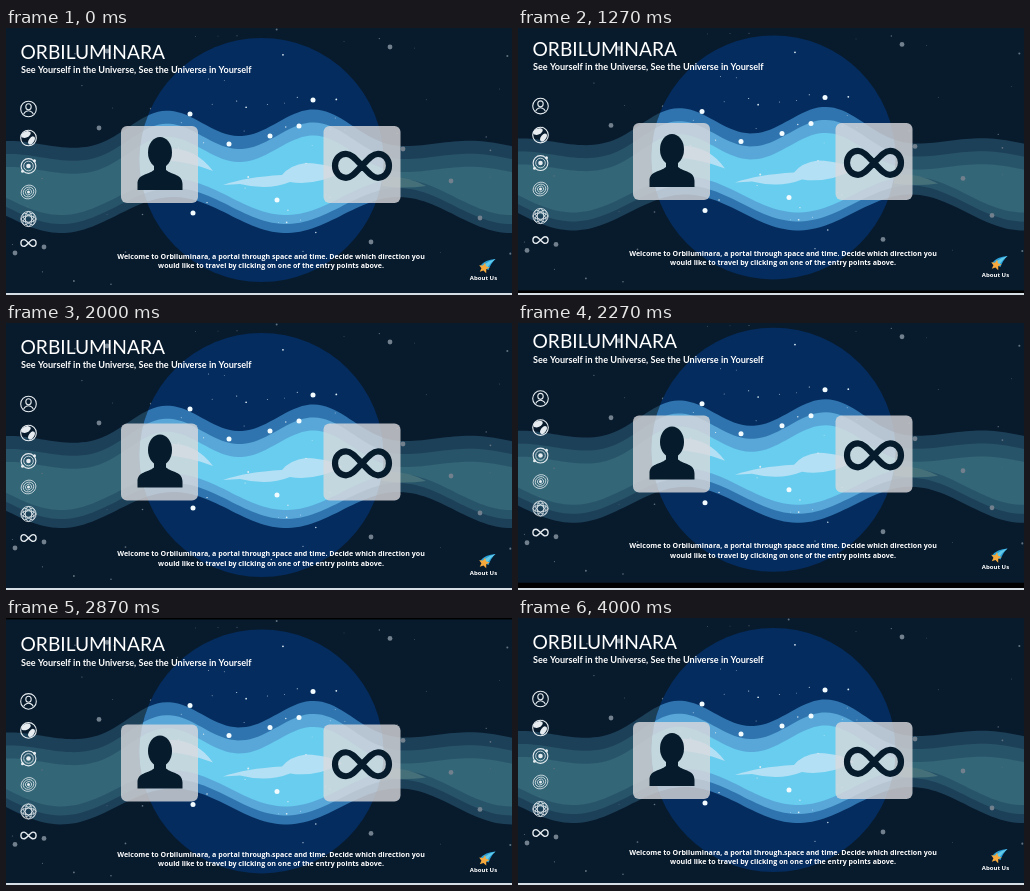
These frames come from a looping animation (506 px wide and 267 px high, 4070 ms). An HTML page with a canvas:

```html
<!DOCTYPE html>
<html lang="en">
<head>
<meta charset="utf-8">
<title>Orbiluminara</title>
<style>
html, body { margin: 0; width: 100%; height: 100%; overflow: hidden; background: #081b2d; }
canvas { display: block; width: 506px; height: 267px; }
</style>
</head>
<body>
<canvas id="stage"></canvas>
<script>
const W = 506, H = 267, FOOT = 265, LOOP = 4070, STEPS = 61;
const TAU = Math.PI * 2;
const SKY = '#081b2d', INK = '#061c2c';
const PLANET = { x: 255.5, y: 132, r: 122 };

const canvas = document.getElementById('stage');
const ctx = canvas.getContext('2d');
const dpr = window.devicePixelRatio || 1;
canvas.width = W * dpr;
canvas.height = H * dpr;

// Page travel: 0 is the bottom stop, TOP the top stop, beyond is rubber band.
const TOP = 6;
const swings = [
  [560, 0], [850, 9], [1250, -3], [1775, 10], [2240, -5.5],
  [2600, -3], [2670, 2], [2850, 8.5], [3070, TOP]
];

function scrollAt(t) {
  const next = swings.findIndex(k => k[0] >= t);
  if (next < 0) return TOP;
  if (next === 0) return 0;
  const [t0, a] = swings[next - 1], [t1, b] = swings[next];
  return a + (b - a) * (1 - Math.cos(Math.PI * (t - t0) / (t1 - t0))) / 2;
}

const overscroll = y => y < 0 ? y : Math.max(0, y - TOP);

function disc(x, y, r, color) {
  ctx.beginPath();
  ctx.arc(x, y, r, 0, TAU);
  ctx.fillStyle = color;
  ctx.fill();
}

function oval(x, y, rx, ry, turn = 0) {
  ctx.beginPath();
  ctx.ellipse(x, y, rx, ry, turn, 0, TAU);
}

function ring(x, y, rx, ry = rx, turn = 0) {
  oval(x, y, rx, ry, turn);
  ctx.stroke();
}

function fillPath(d, color) {
  ctx.fillStyle = color;
  ctx.fill(new Path2D(d));
}

// The river swells over the planet and calms down on both sides.
function upperEdge(x) {
  const swell = Math.exp(-(((x - 240) / 150) ** 4));
  return 118 - 24 * swell - (5 + 9 * swell) * Math.cos(TAU * (x - 156) / 155);
}

const lowerEdge = x => 187 + 18 * Math.cos(TAU * (x - 280) / 225);

const bands = [
  { inset: 0, dim: '#1d4059', lit: '#2f74ae' },
  { inset: 1, dim: '#28546a', lit: '#58a7d8' },
  { inset: 2, dim: '#336677', lit: '#68cdee' }
];

function drawBands(shade) {
  for (const b of bands) {
    ctx.beginPath();
    for (let x = 0; x <= W + 4; x += 4) ctx.lineTo(x, upperEdge(x) + 13 * b.inset);
    for (let x = W + 4; x >= -4; x -= 4) ctx.lineTo(x, lowerEdge(x) - 9 * b.inset);
    ctx.fillStyle = b[shade];
    ctx.fill();
  }
}

function scatter(seed, count, color, pick) {
  const rnd = () => (seed = seed * 16807 % 2147483647) / 2147483647;
  rnd();
  for (let i = 0; i < count; i++) {
    const [x, y] = pick(rnd);
    disc(x, y, 0.4 + 0.7 * rnd() ** 2, color);
  }
}

const onSky = rnd => [rnd() * W, rnd() * FOOT];

function onPlanet(rnd) {
  const a = rnd() * TAU, r = PLANET.r * 0.9 * Math.sqrt(rnd());
  return [PLANET.x + r * Math.cos(a), PLANET.y + r * Math.sin(a)];
}

const brightStars = [[184, 86], [307, 72], [293, 98], [223, 116], [264, 108], [271, 172], [187, 185]];
const paleStars = [[101, 23], [93, 100], [397, 121], [445, 153], [474, 190], [365, 214], [384, 19], [9, 225], [38, 219]];

function drawSky() {
  ctx.fillStyle = SKY;
  ctx.fillRect(0, 0, W, FOOT);
  drawBands('dim');
  fillPath('M376 149Q400 147 420 158Q398 161 376 158', '#45707a');
  scatter(17, 60, '#62727f', onSky);
  for (const [x, y] of paleStars) disc(x, y, 2.4, '#71808c');

  ctx.save();
  disc(PLANET.x, PLANET.y, PLANET.r, '#042c5f');
  ctx.clip();
  drawBands('lit');
  fillPath('M217 157Q240 149 276 147Q284 137 300 135Q325 136 336 144Q310 158 284 154Q262 163 234 156Z', '#b4e0f5');
  fillPath('M146 124Q184 112 207 143Q184 134 158 132Z', '#b4e0f5');
  ctx.restore();
  scatter(5, 36, '#dcecf5', onPlanet);
  for (const [x, y] of brightStars) disc(x, y, 2.5, '#f2fbff');
}

function infinity(x, y, scale, width, color) {
  ctx.save();
  ctx.translate(x, y);
  ctx.scale(scale, scale);
  ctx.lineWidth = width / scale;
  ctx.strokeStyle = color;
  ctx.beginPath();
  ctx.moveTo(0, 0);
  for (const s of [1, -1]) {
    ctx.bezierCurveTo(7 * s, -7.5, 11 * s, -12, 16 * s, -12);
    ctx.bezierCurveTo(22 * s, -12, 27 * s, -7, 27 * s, 0);
    ctx.bezierCurveTo(27 * s, 7, 22 * s, 12, 16 * s, 12);
    ctx.bezierCurveTo(11 * s, 12, 7 * s, 7.5, 0, 0);
  }
  ctx.stroke();
  ctx.restore();
}

function card(x) {
  ctx.beginPath();
  ctx.roundRect(x, 98, 77, 77, 6);
  ctx.fillStyle = 'rgba(218,218,220,.8)';
  ctx.fill();
}

function person() {
  ctx.fillStyle = INK;
  oval(154, 124.5, 12, 15.5);
  ctx.fill();
  fillPath('M148 134H160V142C166 147 176.5 146 176.5 156V162H131.5V156C131.5 146 142 147 148 142Z', INK);
}

function label(str, x, y, font, align = 'left') {
  ctx.font = font;
  ctx.textAlign = align;
  ctx.fillStyle = '#fff';
  ctx.fillText(str, x, y);
}

function drawContent() {
  card(115);
  person();
  card(317.5);
  infinity(356, 137.8, 1, 6.2, INK);
  const font = 'bold 7.08px "Open Sans", sans-serif';
  label('Welcome to Orbiluminara, a portal through space and time. Decide which direction you', 265, 230.6, font, 'center');
  label('would like to travel by clicking on one of the entry points above.', 265, 240, font, 'center');
}

function drawMenu() {
  const x = 22.5, line = '#e6ecf0';
  ctx.strokeStyle = ctx.fillStyle = line;
  ctx.lineWidth = 1.1;

  // person
  ring(x, 81, 7.8);
  ring(x, 78.8, 2.7, 3);
  ctx.beginPath();
  ctx.arc(x, 88, 5.2, Math.PI * 1.12, Math.PI * 1.88);
  ctx.stroke();

  // globe
  ring(x, 110, 7.8);
  oval(x - 2.5, 106.5, 5, 3, -0.4);
  ctx.fill();
  oval(x + 3, 112.5, 2.6, 4.5, 0.6);
  ctx.fill();

  // orbits
  ring(x, 138, 7.4);
  ctx.lineWidth = 0.8;
  ring(x, 138, 4.8);
  disc(x, 138, 2.3, line);
  for (const s of [1, -1]) disc(x + 6 * s, 138 - 5.3 * s, 1.5, line);

  // galaxy
  for (const r of [7.6, 5.4, 3.2]) ring(x, 164, r, r * 0.88, -0.5);
  disc(x, 164, 1.5, line);

  // lattice
  ring(x, 191, 7.6);
  for (let i = 0; i < 4; i++) ring(x, 191, 7.4, 3.2, i * Math.PI / 4);

  infinity(x, 215, 0.28, 1.4, line);
}

function drawAbout() {
  fillPath('M474 238Q479 231.5 489.5 231Q485 235 482.5 242', '#2a9fd8');
  fillPath('M478 237Q482 233 489.5 231Q484 235 481 240', '#63cbea');
  ctx.beginPath();
  for (let i = 0; i < 10; i++) {
    const a = i * TAU / 10 - 1.35, r = i % 2 ? 2.6 : 5.6;
    ctx.lineTo(478 + r * Math.cos(a), 240 + r * Math.sin(a));
  }
  ctx.fillStyle = '#f5a83c';
  ctx.fill();
  label('About Us', 477.5, 251.5, 'bold 6px "Open Sans", sans-serif', 'center');
}

function drawFixed() {
  label('ORBILUMINARA', 14.5, 30.5, '400 19.2px Lato, sans-serif');
  label('See Yourself in the Universe, See the Universe in Yourself', 15, 45.2, 'bold 9.1px Lato, sans-serif');
  drawMenu();
  drawAbout();
}

function shifted(y, draw) {
  ctx.save();
  ctx.translate(0, y);
  draw();
  ctx.restore();
}

function render(t) {
  const y = scrollAt(t);
  ctx.setTransform(dpr, 0, 0, dpr, 0, 0);
  ctx.fillStyle = '#000';
  ctx.fillRect(0, 0, W, H);
  // the backdrop trails the page by one step
  shifted(overscroll(scrollAt(t - LOOP / STEPS)), drawSky);
  shifted(y, drawContent);
  shifted(overscroll(y), drawFixed);
  ctx.fillStyle = '#d5dee4';
  ctx.fillRect(0, FOOT, W, H - FOOT);
}

const start = performance.now();
function tick() {
  const t = (performance.now() - start) % LOOP;
  const step = Math.floor((t + 4) * STEPS / LOOP) % STEPS;
  render(step * LOOP / STEPS);
  requestAnimationFrame(tick);
}
tick();
</script>
</body>
</html>
```
